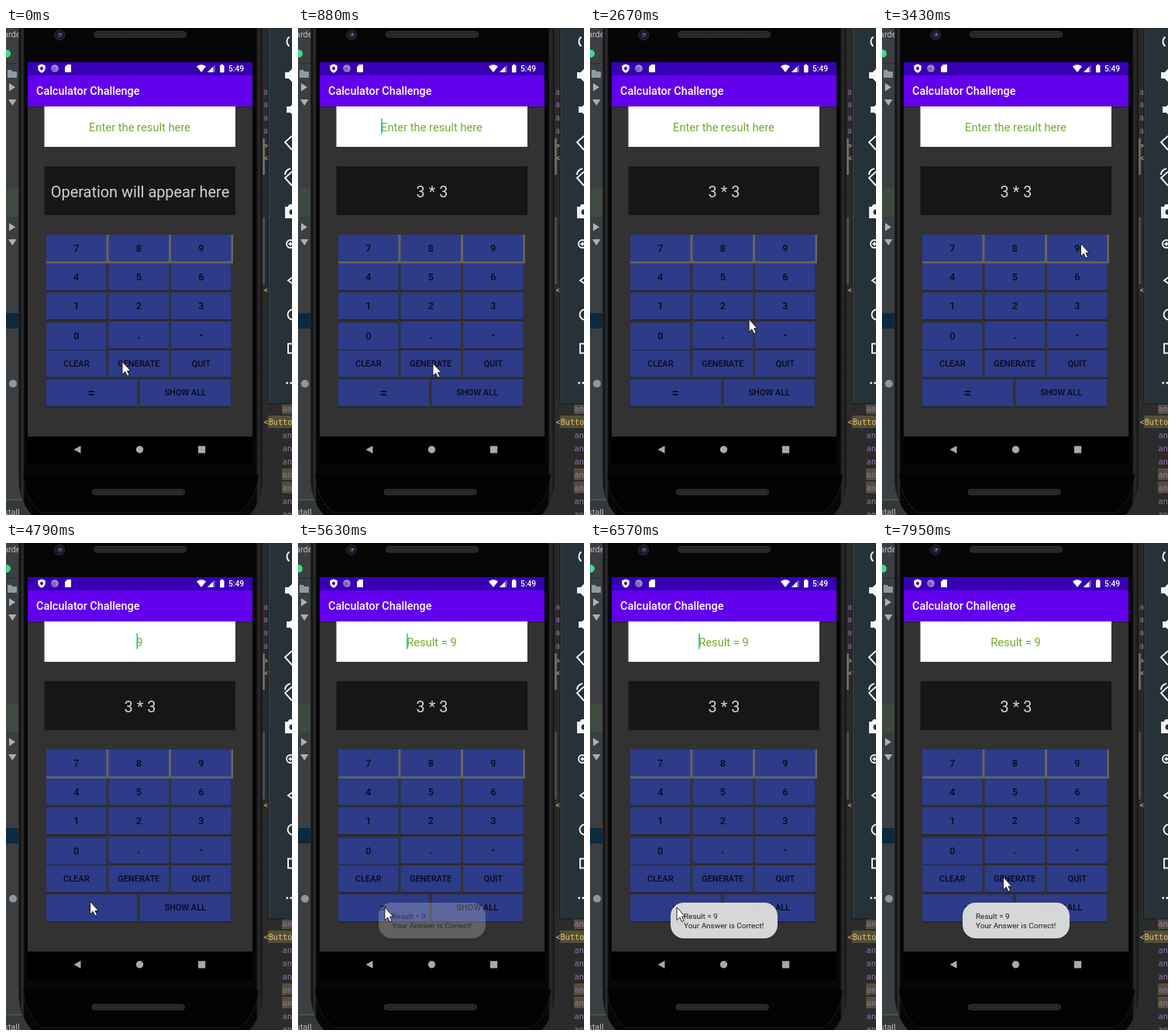
Recreate the animation shown at these times as an HTML page. Size 369 px wide and 627 px high, loop 8000 ms.

```html
<!DOCTYPE html>
<html lang="en">
<head>
<meta charset="utf-8">
<title>Calculator</title>
<style>
  html, body { margin: 0; width: 100%; height: 100%; overflow: hidden; background: #2b2b2b; }
  svg { display: block; width: 369px; height: 627px; font-family: Roboto, sans-serif; }
  .mid { text-anchor: middle; }
  .key { font-weight: 500; fill: #070a1c; text-anchor: middle; }
  .code { font: 10.2px "DejaVu Sans Mono", monospace; }
  .icon { fill: none; stroke: #f2f4f5; stroke-width: 1.9; }
</style>
</head>
<body>
<svg viewBox="0 0 369 627">
  <defs>
    <linearGradient id="rim">
      <stop offset="0" stop-color="#0e0e0f"/>
      <stop offset=".01" stop-color="#1d1d1f"/>
      <stop offset=".016" stop-color="#303032"/>
      <stop offset=".024" stop-color="#060606"/>
      <stop offset=".972" stop-color="#060606"/>
      <stop offset=".984" stop-color="#2b2b2d"/>
      <stop offset="1" stop-color="#141415"/>
    </linearGradient>
  </defs>

  <!-- editor, left -->
  <rect width="22" height="627" fill="#3c3f41"/>
  <rect y="207" width="16" height="36" fill="#3f4b40"/>
  <rect y="367" width="16" height="20" fill="#0d293e"/>
  <path d="M0 45.5H16" stroke="#2b2d2e"/>
  <rect y="608" width="60" height="19" fill="#34383a"/>
  <path d="M0 607.5H30" stroke="#4b6a4b"/>
  <g fill="#bbb" font-size="11">
    <text x="-3" y="12">arde</text>
    <text x="-3" y="627">stall</text>
  </g>
  <circle cx="1" cy="33" r="5" fill="#3ddc84"/>
  <circle cx="9" cy="458" r="5" fill="#8f979b"/>
  <path d="M2 54h5l1 2h6v8H2z" fill="#8d9ba3"/>
  <path d="M4 71l8 5.300-8 5.300zM4 251l8 5.300-8 5.300zM3 92h10.500l-5.200 8zM3 272h10.500l-5.200 8z" fill="#adb0b2"/>

  <!-- editor, right -->
  <rect x="322" width="47" height="627" fill="#2b2b2b"/>
  <g fill="#52503a">
    <rect x="356" y="483" width="13" height="14"/>
    <rect x="338" y="499" width="31" height="16"/>
    <rect x="356" y="567" width="13" height="15"/>
    <rect x="356" y="584" width="13" height="15"/>
  </g>
  <g class="code" id="code"></g>

  <!-- phone -->
  <path d="M16.500 -5H331V585Q330 612 310 632H38Q17.500 612 16.500 585Z" fill="url(#rim)"/>
  <path d="M22 575Q24 606 46 624H302Q324 606 326 575" fill="#030303" stroke="#1b1b1c"/>
  <rect x="331" y="142" width="3" height="47" fill="#686868"/>
  <rect x="331" y="244" width="3" height="86" fill="#4c4c4c"/>
  <circle cx="69" cy="9" r="6.500" fill="#18181b" stroke="#303034"/>
  <circle cx="69.500" cy="9" r="3.200" fill="#2b3760"/>
  <circle cx="70.500" cy="8" r="1.100" fill="#7585b5"/>
  <g fill="#232323" stroke="#363636">
    <rect x="113.500" y="4.500" width="119" height="7.500" rx="3.500"/>
    <rect x="111" y="594" width="119.500" height="7" rx="3.500"/>
  </g>
  <path d="M117 8.500H229M115 597.500H227" stroke="#3a3a3a" stroke-width="1.500" stroke-dasharray="2 1.500"/>

  <!-- app -->
  <rect x="28" y="44" width="290" height="482" fill="#323232"/>
  <rect x="28" y="101" width="290" height="2" fill="#2a2a2a"/>
  <rect x="28" y="44" width="290" height="17" fill="#3700b3"/>
  <rect x="28" y="61" width="290" height="40" fill="#6200ee"/>
  <text x="39" y="86" font-size="14.400" font-weight="500" fill="#fff">Calculator Challenge</text>
  <g fill="#fff">
    <path d="M46 46.500l4.700 1.800v3.500q0 4.200-4.700 6-4.700-1.800-4.700-6v-3.500z"/>
    <path d="M46 49.300l2.400 2.700-2.400 2.700-2.400-2.700z" fill="#3700b3"/>
    <circle cx="63" cy="52" r="4.800" fill="#9c86cf"/>
    <circle cx="62" cy="52.800" r="2.800" fill="#7c66b8"/>
    <path d="M79 47h5v10h-8v-7z"/>
    <path d="M246 49.500q6-4.500 12 0l-6 7.500z"/>
    <path d="M269.500 47.500v9.500h-9.500z" opacity=".4"/>
    <path d="M267 50v7h-7z"/>
    <path d="M276 48h1.500v-1.200h2.500V48h1.500v9.300H276z"/>
    <text x="287" y="56.300" font-size="10.200" font-weight="500">5:49</text>
  </g>
  <rect x="49.500" y="101" width="246.500" height="52" fill="#fff"/>
  <rect x="49.500" y="178" width="246.500" height="63" fill="#161616"/>
  <text id="field" class="mid" x="172.500" y="132.500" font-size="14.700" fill="#6fae27"></text>
  <rect id="caret" y="116.500" width="1.500" height="20" fill="#03c6b6"/>
  <text id="task" class="mid" x="173" y="217.500" font-size="19.900" fill="#d2d2d2"></text>
  <g id="keys"></g>
  <rect x="28" y="526" width="290" height="35" fill="#000"/>
  <g fill="#a9a9a9">
    <path d="M96.500 537.800v10L87.500 542.800z"/>
    <circle cx="172.500" cy="542.800" r="4.700"/>
    <rect x="248" y="538.200" width="9.200" height="9.200"/>
  </g>

  <!-- emulator bar -->
  <rect x="338" y="-1" width="40" height="485" fill="#263238" stroke="#14191c"/>
  <path d="M339.500 0V483" stroke="#37444b"/>
  <g class="icon">
    <path d="M365.500 11.500a7.500 7.500 0 0 0 0 12M370 9v8"/>
    <path d="M361 58h4l5-5v16l-5-5h-4zM363 102h4l4-4v14l-4-4h-4z" fill="#f2f4f5"/>
    <path d="M369 139l-9 8 9 10M369 185l-9 8 9 10M360 189q0-6 7-8"/>
    <path d="M361 231h3l2-3h6v16h-11z" fill="#f2f4f5"/>
    <circle cx="369" cy="237" r="3.500" fill="#263238" stroke="none"/>
    <circle cx="367" cy="278" r="5"/>
    <path d="M364.500 278h5M367 275.500v5M370 282l3 3"/>
    <path d="M371 320l-7 5 7 5"/>
    <circle cx="370" cy="369" r="6.500"/>
    <rect x="364" y="406.500" width="12" height="12"/>
    <path d="M361.500 457h2.500M366.500 457h2.500" stroke-width="2.500"/>
  </g>

  <g id="toast">
    <rect x="104" y="463" width="138" height="46" rx="17" fill="#dcdcdc" opacity=".97"/>
    <g font-size="9.950" fill="#1c1c1c">
      <text x="121" y="484">Result = 9</text>
      <text x="121" y="495.800">Your Answer is Correct!</text>
    </g>
  </g>
  <path id="mouse" d="M1 .5V17l3.800-3.500 2.600 5.600 2.700-1.200-2.600-5.400h4.300z" fill="#fff" stroke="#111" stroke-width=".9"/>
</svg>

<script>
const LOOP = 8000;
const $ = id => document.getElementById(id);

function add(parent, tag, attrs, text = "") {
  const el = document.createElementNS("http://www.w3.org/2000/svg", tag);
  for (const name in attrs) el.setAttribute(name, attrs[name]);
  el.textContent = text;
  parent.append(el);
}

const box = (x, y, width, height, fill) => add($("keys"), "rect", { x, y, width, height, fill });

function key(label, x, y, w, size, shade = "#272729") {
  box(x, y + 1, w, 35.5, shade);
  box(x, y, w, 34.5, "#2d3b88");
  add($("keys"), "text", { class: "key", x: x + w / 2, y: y + 17 + size * .36, "font-size": size }, label);
}

// The top row sits on a lighter plate
box(52, 266, 241, 37, "#68655f");
const rows = [[266, "7 8 9"], [303, "4 5 6"], [340.5, "1 2 3"], [378, "0 . -"], [415, "CLEAR GENERATE QUIT"]];
for (const [y, labels] of rows)
  labels.split(" ").forEach((s, i) => {
    const size = s.length > 1 ? 11 : /\d/.test(s) ? 12.6 : 15;
    key(s, 52 + i * 80.5, s === "0" ? y + 1.5 : y, 77.5, size, y === 266 ? "#68655f" : undefined);
  });
key("=", 52, 452.5, 117, 17.5);
key("SHOW ALL", 172.5, 452.5, 117.5, 11);

const code = (s, x, y, fill) => add($("code"), "text", { x, y, fill }, s);
for (const y of [86, 102, 119, 136]) code("a", 332, y, "#9876aa");
for (const [s, y] of [[">", 155], ["<", 171], ["<", 341], ["<Button", 511]]) code(s, 332.5, y, "#e8bf6a");
for (const y of [494, 528, 545, 562, 579, 596, 613, 630]) code("and", 356.5, y, "#9876aa");

// Mouse moves: start, end, number of jumps, end x, end y
const moves = [
  [150, 150, 1, 202, 428], [420, 590, 2, 173, 431],
  [2220, 3130, 7, 252, 287], [3280, 3430, 2, 255.5, 277],
  [4360, 4790, 4, 107.5, 461], [5070, 5300, 3, 111, 468.5],
  [7250, 7900, 5, 155.5, 429.5]
];
const blinks = [150, 420, 880, 1370, 1900, 2400, 2900, 3430, 3830, 4360, 4790, 5290, 5480, 6040, 6570, 6980, 7500, 7950];

function mouseAt(t) {
  let x = 149, y = 429;
  for (const [from, to, n, tx, ty] of moves) {
    if (t < from) break;
    const jump = n > 1 ? Math.floor((t - from) / (to - from) * (n - 1) + 1e-6) + 1 : 1;
    const p = Math.min(1, jump / n);
    const e = p * p * (3 - 2 * p);
    x += (tx - x) * e;
    y += (ty - y) * e;
  }
  return [x, y];
}

function draw(t) {
  const [label, caretX] = t < 3830 ? ["Enter the result here", 107.2]
    : t < 5480 ? ["9", 168.5] : ["Result = 9", 140.2];
  $("field").textContent = label;
  $("caret").setAttribute("x", caretX);
  $("caret").setAttribute("opacity", blinks.filter(b => b <= t).length % 2);
  $("task").textContent = t < 880 ? "Operation will appear here" : "3 * 3";
  $("toast").setAttribute("opacity", Math.max(0, Math.min(1, (t - 5530) / 360)));
  $("mouse").setAttribute("transform", `translate(${mouseAt(t)})`);
}

const start = performance.now();
function tick() {
  draw((performance.now() - start) % LOOP);
  requestAnimationFrame(tick);
}
tick();
</script>
</body>
</html>
```
